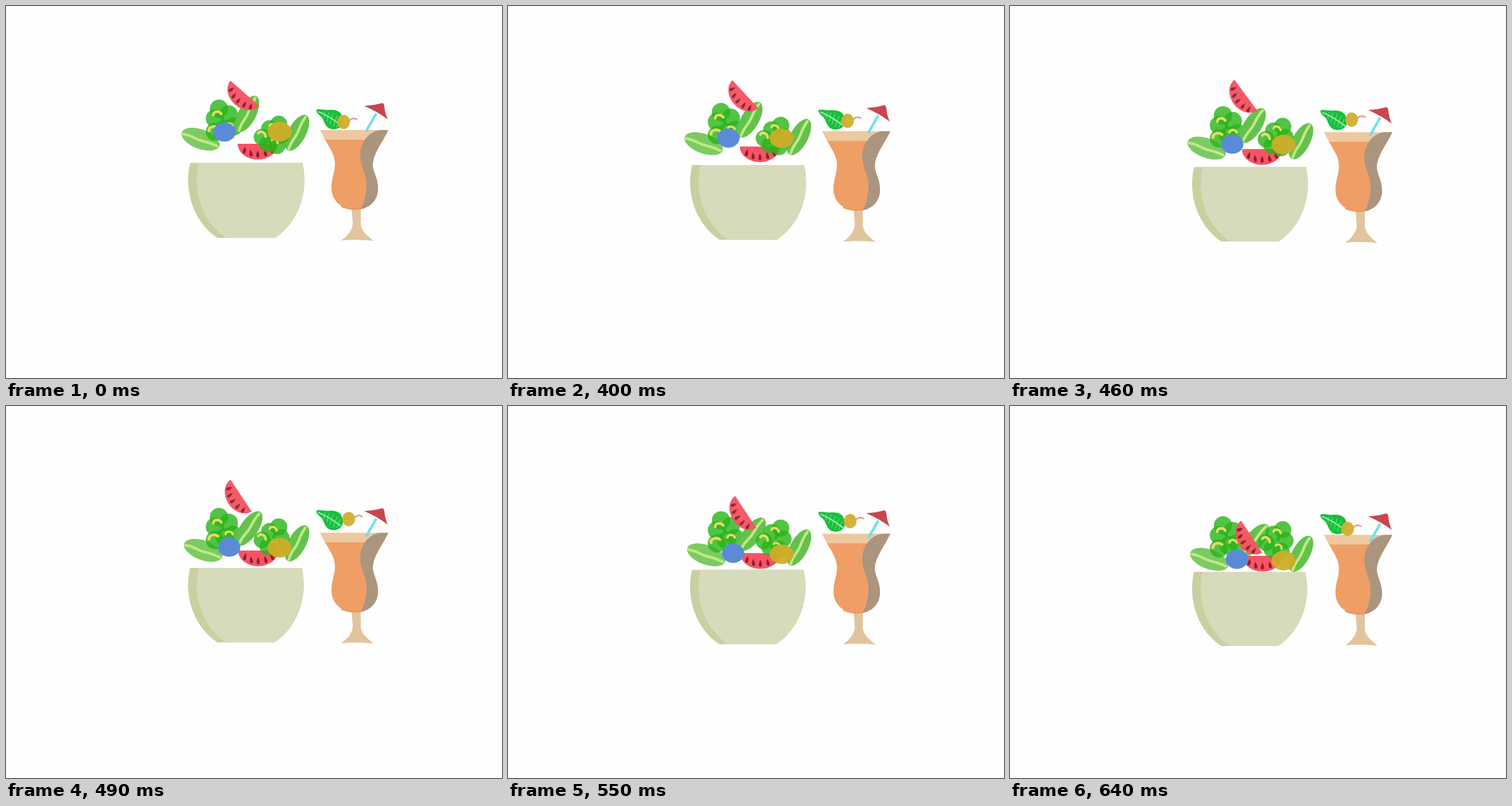
An HTML page for the animation above (1970 ms loop, 864 px wide and 648 px high).

```html
<!DOCTYPE html>
<html lang="en">
<head>
<meta charset="utf-8">
<title>Salad bowl and drink</title>
<style>
  /* --k counts the ten motion steps; every part derives its pose from it */
  @property --k { syntax: "<number>"; inherits: true; initial-value: 0; }

  html, body { margin: 0; width: 100%; height: 100%; overflow: hidden; background: #fefefe; }
  svg { display: block; width: 864px; height: 648px; animation: drop 1970ms infinite; }

  @keyframes drop {
    0% { --k: 0; animation-timing-function: step-end; }
    18.78% { --k: 1; animation-timing-function: steps(9, end); }
    32.487%, 100% { --k: 10; }
  }

  #scene {
    --c: min(var(--k), 9);
    --rise: min(var(--k), 5);
    --fall: max(var(--k) - 5, 0);
    --out: min(var(--k), 6);
    --back: max(var(--k) - 6, 0);
  }

  /* parts that slide at a constant rate, settling one step early */
  .early { transform: translate(calc(var(--c) * var(--x, 0) * 1px), calc(var(--c) * var(--y) * 1px)); }
  /* parts that slide through all ten steps */
  .full { transform: translateY(calc(var(--k) * var(--y) * 1px)); }

  #bowl {
    transform: translate(317px, calc(273.5px + var(--c) * 1.72px))
      scale(calc(1 - var(--c) * .0012)) translate(-317px, -273.5px);
  }
  #midLeaf {
    transform: translate(calc(420.2px + var(--c) * .67px), calc(188px + var(--c) * 5.06px))
      rotate(calc(-63deg + var(--c) * 1.44deg));
  }
  #topMelon {
    transform: translate(calc(416px - var(--rise) * 1.3px + var(--fall) * 2.3px),
                         calc(152px + var(--rise) * .8px + var(--fall) * 14.3px))
      rotate(calc(41.3deg + var(--rise) * 3.04deg)) scale(.95);
  }
  #mint { transform: translateY(calc(var(--rise) * .3px + var(--fall) * 1.4px)); }
  #olive {
    transform: translate(calc(588px + var(--out) * 1.78px - var(--back) * 2.67px),
                         calc(202px - var(--out) * 1px + var(--back) * 4.5px));
  }

  .floret { fill: #28b418; fill-opacity: .8; }
  .nut { fill: none; stroke: #e3da66; stroke-width: 4.6; stroke-linecap: round; }
  .rib { fill: none; stroke: #bfe986; stroke-width: 4.6; stroke-linecap: round; }
</style>
</head>
<body>
<svg viewBox="0 0 864 648">
  <defs>
    <g id="melon">
      <path fill="#f65463" d="M-35 0H35A35 27.5 0 0 1 -35 0Z"/>
      <g fill="#8e2030">
        <use href="#seed" transform="translate(-23 11) rotate(14)"/>
        <use href="#seed" transform="translate(-12 16.5) rotate(-6)"/>
        <use href="#seed" transform="translate(0 18)"/>
        <use href="#seed" transform="translate(13 16) rotate(-14)"/>
        <use href="#seed" transform="translate(24 11) rotate(-24)"/>
      </g>
    </g>
    <path id="seed" d="M0 -6.5C1.5 -3 3 0 2.7 3C2.2 7 -2.2 7 -2.7 3C-3 0 -1.5 -3 0 -6.5Z"/>
    <path id="rib" class="rib" d="M-32 .5Q-22 -1.500 -12 0T8 0T31 0"/>
    <g id="leaf">
      <ellipse rx="34.7" ry="15.5" fill="#64c14c"/>
      <use href="#rib"/>
    </g>
    <path id="nut" class="nut" d="M-7 3C-7 -4 3 -5 7 1"/>
  </defs>

  <g id="scene">
    <g id="bowl">
      <path fill="#cacf9f" d="M320.5 273.5A101.5 116 0 0 0 368.5 404H468.5A101.5 116 0 0 0 516.5 273.5Z"/>
      <path fill="#d7dabb" d="M335.5 273.5A101.5 116 0 0 0 383.5 404H468.5A101.5 116 0 0 0 516.5 273.5Z"/>
    </g>

    <g class="early" style="--x:.89;--y:3.89">
      <g transform="translate(339 232) rotate(20)">
        <ellipse rx="35" ry="17" fill="#7dca63"/>
        <use href="#rib" y="1.5"/>
      </g>
    </g>

    <g class="full" style="--y:2.9">
      <g class="floret">
        <circle cx="371" cy="179" r="16"/>
        <circle cx="388" cy="189" r="16"/>
        <circle cx="364" cy="196" r="16"/>
        <circle cx="364" cy="219" r="16"/>
        <circle cx="381" cy="214" r="16"/>
        <circle cx="396" cy="210" r="16"/>
      </g>
      <use href="#nut" x="368" y="187"/>
      <use href="#nut" transform="translate(361 213) rotate(-12) scale(1.15 1)"/>
      <use href="#nut" transform="translate(389 207) rotate(8) scale(.9)"/>
    </g>

    <g id="midLeaf"><use href="#leaf"/></g>

    <g class="early" style="--x:.15;--y:2.33">
      <use href="#melon" x="438.5" y="240"/>
    </g>

    <g class="full" style="--y:3.65">
      <use href="#leaf" transform="translate(507 221) rotate(-62)"/>
    </g>

    <g class="full" style="--y:.95">
      <g class="floret">
        <circle cx="475" cy="206" r="15"/>
        <circle cx="459" cy="213.5" r="14.5"/>
        <circle cx="479" cy="225" r="15"/>
        <circle cx="446" cy="228.5" r="14.5"/>
        <circle cx="456" cy="240" r="14.5"/>
        <circle cx="472" cy="243" r="15"/>
      </g>
      <use href="#nut" transform="translate(466 209) rotate(22) scale(.9)"/>
      <use href="#nut" transform="translate(447 223) rotate(32)"/>
      <use href="#nut" transform="translate(469 235) rotate(35) scale(.8)"/>
    </g>

    <g id="topMelon" opacity=".96">
      <path d="M-82 -28Q-82 -8 -47 15" fill="none" stroke="#fafafa" stroke-width="3" stroke-dasharray="3 6"/>
      <use href="#melon"/>
    </g>

    <g class="early" style="--x:1.65;--y:5.28">
      <ellipse cx="380.5" cy="219.5" rx="19.5" ry="16.7" fill="#5b8bd8"/>
    </g>
    <g class="early" style="--y:5.6">
      <ellipse cx="476.5" cy="219" rx="21" ry="17" fill="#cfad29" fill-opacity=".95"/>
    </g>

    <g class="early" style="--y:.94">
      <path fill="#e1c49e" d="M602 352H618V380C619 393 630 400 640 409Q612 406 584 408.5C594 401 604 391 604 378Z"/>
      <path fill="#eec9a0" d="M547 216H666L657 234H556Z"/>
      <path fill="#ef9f66" d="M556 233H657C649 247 638 262 639 279C640 290 648 300 648 318C648 342 628 354.5 607 354.5C585 354.5 567 339 567 317C567 298 573 291 573 275C573 259 563 246 556 233Z"/>
      <path fill="none" stroke="#ef9250" stroke-width="2" d="M584 349Q606 358 626 351"/>
      <path fill="none" stroke="#e6a368" d="M556 233.5H636"/>
      <path fill="#ab957f" d="M666 216C657 236 638 258 639 279C640 290 648 300 648 318C648 338 635 351 618 353.5C625 340 628 325 628 311C628 292 617 280 617 260C617 240 630 218 653 216Z"/>
    </g>

    <g class="full" style="--y:1.82">
      <path stroke="#6fe1ea" stroke-width="4.5" d="M627 218.5L645 187"/>
      <path fill="#c9464f" d="M624 174Q642 173 655 169Q658 169 659 174Q660 187 665 197.5Q647 184 624 174Z"/>
    </g>

    <g id="mint">
      <path fill="#17c03c" d="M541 181C545 178 554 182 563 181C574 180 584 184 585 192C588 198 588 207 582 211C576 216 565 216 560 211C553 205 554 196 547 191C543 188 540 184 541 181Z"/>
      <path fill="none" stroke="#a4e9ad" stroke-width="2.2" d="M544 184Q562 191 584 208"/>
      <path fill="none" stroke="#8fe29b" d="M553 188L557 184M560 192L563 185M567 196L570 187M573 200L577 191M579 204L582 196M554 189V195M561 193L559 201M567 197L564 206M573 201L570 210M579 205L576 211"/>
    </g>

    <g id="olive">
      <path fill="none" stroke="#dfa0a8" stroke-width="3" d="M10 -3Q17 -9 24 -4"/>
      <ellipse rx="11" ry="12.5" fill="#d1b032" fill-opacity=".97"/>
    </g>
  </g>
</svg>
</body>
</html>
```
